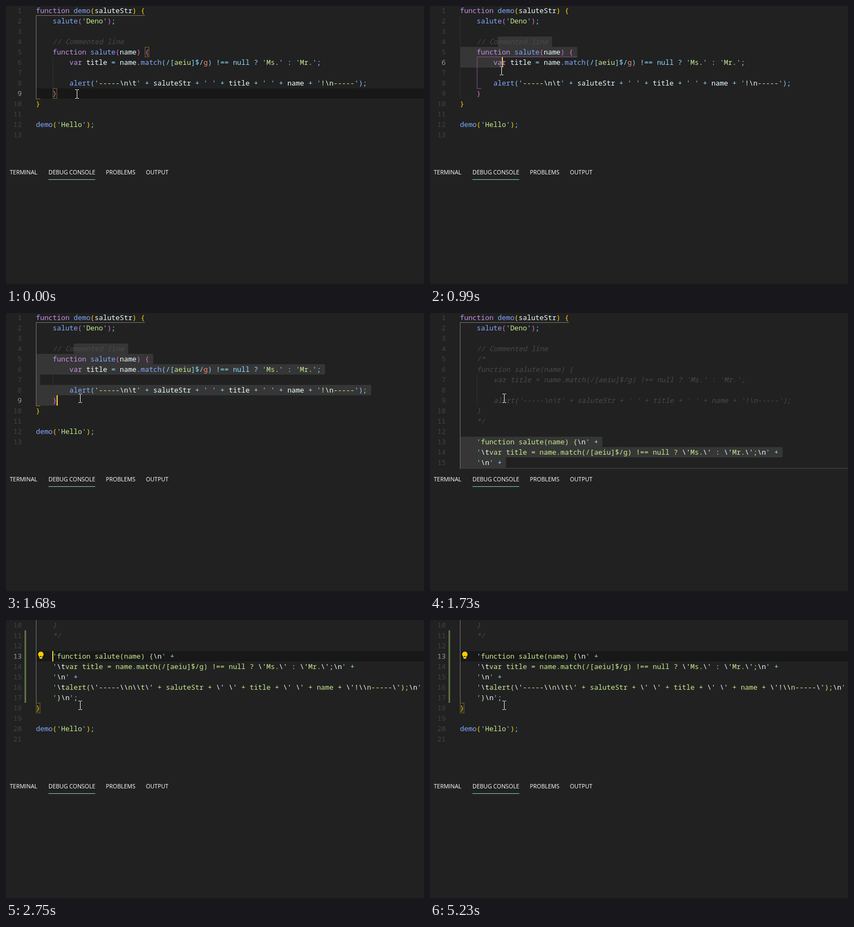
Write an HTML page with a canvas that moves like this. It is 768 by 512 pixels and loops after 5.64 s.

```html
<!DOCTYPE html>
<html lang="en">
<head>
<meta charset="utf-8">
<style>
  html, body { margin: 0; width: 100%; height: 100%; overflow: hidden; background: #212121; }
  canvas { display: block; }
</style>
</head>
<body>
<canvas id="stage" width="768" height="512"></canvas>
<script>
const ctx = document.getElementById('stage').getContext('2d');
const LOOP = 5640, LEFT = 55, CELL = 7.7, ROW = 19, PANEL_TOP = 286;
const CODE_FONT = '12.83px "Noto Sans Mono", "DejaVu Sans Mono", monospace';
const COLOR = {
  plain: '#eeffff', keyword: '#c792ea', call: '#82aaff', string: '#c8ed90',
  punct: '#89ddff', flag: '#f78c6c', comment: '#4a4a4a'
};
const BRACKETS = ['#ffd700', '#da70d6', '#87cefa'];

const before = String.raw`function demo(saluteStr) {
    salute('Deno');

    // Commented line
    function salute(name) {
        var title = name.match(/[aeiu]$/g) !== null ? 'Ms.' : 'Mr.';

        alert('-----\n\t' + saluteStr + ' ' + title + ' ' + name + '!\n-----');
    }
}

demo('Hello');
`.split('\n');

const after = [
  ...before.slice(0, 4),
  '    /*',
  ...before.slice(4, 9),
  '    */',
  '',
  ...String.raw`    'function salute(name) {\n' +
    '\tvar title = name.match(/[aeiu]$/g) !== null ? \'Ms.\' : \'Mr.\';\n' +
    '\n' +
    '\talert(\'-----\\n\\t\' + saluteStr + \' \' + title + \' \' + name + \'!\\n-----\');\n' +
    '}\n';`.split('\n'),
  ...before.slice(9)
];

// Returns, per line, a list of [column, text, colour, italic].
function highlight(lines) {
  const token = /\/\/.*|'(?:\\.|[^'\\])*'|\/\[.*?\/g|\w+|[^\s\w]/g;
  let depth = 0, inBlock = false;
  return lines.map(line => {
    const out = [];
    if (line.includes('/*')) inBlock = true;
    if (inBlock) {
      if (line.includes('*/')) inBlock = false;
      return [[0, line, COLOR.comment, true]];
    }
    for (const { 0: text, index } of line.matchAll(token)) {
      const add = (offset, part, color, italic) => out.push([index + offset, part, color, italic]);
      if (text.startsWith('//')) add(0, text, COLOR.comment, true);
      else if (text[0] === "'") {
        for (const m of text.matchAll(/\\.|'|[^\\']+/g)) {
          add(m.index, m[0], m[0] === "'" ? COLOR.punct : m[0][0] === '\\' ? COLOR.plain : COLOR.string);
        }
      } else if (text.startsWith('/[')) {
        for (const m of text.matchAll(/\w+|\W/g)) {
          add(m.index, m[0], m[0] === 'g' ? COLOR.flag : /\w/.test(m[0]) ? COLOR.string : COLOR.punct);
        }
      } else if ('({'.includes(text)) add(0, text, BRACKETS[depth++]);
      else if (')}'.includes(text)) add(0, text, BRACKETS[--depth]);
      else if (/^(function|var)$/.test(text)) add(0, text, COLOR.keyword);
      else if (text === 'null' || /\W/.test(text)) add(0, text, COLOR.punct);
      else add(0, text, line[index + text.length] === '(' ? COLOR.call : COLOR.plain);
    }
    return out;
  });
}

const makeDoc = (lines, guides) => ({ lines, guides, tokens: highlight(lines) });
const source = makeDoc(before, [[0, 2, 9], [4, 6, 8]]);
const result = makeDoc(after, [[0, 2, 17], [4, 7, 9]]);

const outer = { col: 0, first: 1, last: 10, endCol: 26, color: '#77736a', tail: '#8f7a10' };
const inner = { col: 4, first: 5, last: 9, endCol: 28, color: '#7d5280', tail: '#7d5280' };
const resultScope = { ...outer, last: 18 };

const editing = { doc: source, top: -1, scope: outer };
const drag = (line, col, scope) => ({ ...editing, scope, caret: [line, col], select: [4, 9, line, col] });
const scrolled = { doc: result, top: -171, scope: resultScope, band: 13, caret: [13, 4] };
const states = [
  [0, { ...editing, band: 9, boxes: [[5, 26], [9, 4]] }],
  [660, { ...editing, band: 4, caret: [4, 9] }],
  [755, { ...drag(4, 10, outer), match: 'm' }],
  [800, drag(5, 10, outer)],
  [930, drag(6, 10, inner)],
  [1040, drag(7, 0, inner)],
  [1250, drag(9, 5, outer)],
  [1730, { doc: result, top: -1, scope: resultScope, select: [13, 0, 17, 10] }],
  [1760, scrolled],
  [1990, { ...scrolled, boxes: [[18, 0]], changed: [11, 17], bulb: true }]
];
const blinks = [2220, 2750, 3250, 3710, 4240, 4700, 5230];

const mousePath = [
  [50, 130, 161], [190, 128, 146], [330, 125, 112], [470, 125, 82], [605, 127, 68],
  [700, 125, 67], [760, 129, 68], [850, 131, 82], [980, 131, 118],
  [1100, 132, 120], [1165, 133, 130], [1215, 136, 156]
];

function mouseAt(time) {
  const t = 50 + Math.floor((time - 50) / 46.66) * 46.66;
  const next = mousePath.findIndex(p => p[0] > t);
  if (next === 0) return mousePath[0].slice(1);
  if (next < 0) return mousePath.at(-1).slice(1);
  const [a, b] = [mousePath[next - 1], mousePath[next]];
  const k = (t - a[0]) / (b[0] - a[0]);
  return [1, 2].map(i => Math.round(a[i] + (b[i] - a[i]) * k));
}

function rect(color, x, y, w, h) {
  ctx.fillStyle = color;
  ctx.fillRect(x, y, w, h);
}

function roundBox(color, x, y, w, h) {
  ctx.fillStyle = color;
  ctx.beginPath();
  ctx.roundRect(x, y, w, h, 2);
  ctx.fill();
}

const colX = col => LEFT + col * CELL;

// Each glyph sits in its own cell of the monospaced grid.
function drawCells(text, x, y, color, italic) {
  ctx.font = (italic ? 'italic ' : '') + CODE_FONT;
  ctx.fillStyle = color;
  [...text].forEach((ch, i) => ch !== ' ' && ctx.fillText(ch, x + i * CELL, y));
}

function drawEditor(state, caretOn) {
  const { doc, top, scope, band, caret, select, boxes = [] } = state;
  const lineY = line => top + (line - 1) * ROW;
  const activeLine = band || (caret && caret[0]);

  if (band) rect('#181818', LEFT, lineY(band), 768 - LEFT, ROW);
  if (state.match) {
    doc.lines.forEach((line, i) => [...line].forEach((ch, col) => {
      if (ch.toLowerCase() === state.match) roundBox('#303030', colX(col), lineY(i + 1), CELL, ROW);
    }));
  }
  if (select) {
    const [l1, c1, l2, c2] = select;
    for (let line = l1; line <= l2; line++) {
      const from = line === l1 ? c1 : 0;
      const to = line === l2 ? c2 : doc.lines[line - 1].length + 1;
      roundBox('#363636', colX(from), lineY(line), (to - from) * CELL, ROW);
    }
  }

  for (const [col, first, last] of doc.guides) {
    rect('#303030', Math.floor(colX(col) + 0.3), lineY(first), 1, (last - first + 1) * ROW);
  }
  const x = Math.floor(colX(scope.col) + 0.3);
  const y1 = lineY(scope.first + 1) - 1, y2 = lineY(scope.last);
  rect(scope.color, x, y1, 1, y2 - y1);
  rect(scope.color, x, y1, (scope.endCol - scope.col) * CELL, 1);
  rect(scope.tail, x, y2, 8, 1);

  for (const [line, col] of boxes) {
    ctx.strokeStyle = '#75652a';
    ctx.strokeRect(Math.floor(colX(col) + 0.3) + 0.5, lineY(line) + 0.5, 7, ROW - 1);
  }

  doc.tokens.forEach((tokens, i) => {
    const line = i + 1, y = lineY(line) + 14, label = String(line);
    drawCells(label, 29 - label.length * CELL, y, line === activeLine ? '#8f9d9f' : '#424242');
    for (const [col, text, color, italic] of tokens) drawCells(text, colX(col), y, color, italic);
  });

  if (state.changed) {
    const [first, last] = state.changed;
    rect('#5f7048', 34, lineY(first), 3, (last - first + 1) * ROW);
  }
  if (state.bulb) drawBulb(64, lineY(13) + 6);
  if (caret && caretOn) rect('#ffcb45', Math.floor(colX(caret[1])), lineY(caret[0]), 2, ROW);
}

function drawBulb(x, y) {
  ctx.fillStyle = '#ffcc00';
  ctx.beginPath();
  ctx.arc(x, y, 5, 0, Math.PI * 2);
  ctx.fill();
  rect('#ffcc00', x - 2.5, y + 3, 5, 5);
  rect('#181818', x - 1, y + 3, 2, 2);
}

function drawPanel() {
  rect('#212121', 0, PANEL_TOP, 768, 512 - PANEL_TOP);
  ctx.font = '10.5px "Open Sans", "Noto Sans", sans-serif';
  ctx.fillStyle = '#ffffff';
  [['TERMINAL', 7], ['DEBUG CONSOLE', 78], ['PROBLEMS', 183.5], ['OUTPUT', 257]]
    .forEach(([text, x]) => ctx.fillText(text, x, 309));
  rect('#80cbc4', 78, 318, 86, 1);
  rect('#1a1a1a', 0, 510, 768, 2);
}

function drawMouse([x, y]) {
  const parts = [[-3, -8, 3, 1], [1, -8, 3, 1], [0, -7, 1, 15], [-3, 8, 3, 1], [1, 8, 3, 1]];
  for (const [dx, dy, w, h] of parts) rect('#111111', x + dx - 0.5, y + dy - 0.5, w + 1, h + 1);
  for (const [dx, dy, w, h] of parts) rect('#ffffff', x + dx, y + dy, w, h);
}

function draw(now) {
  const time = now % LOOP;
  const state = states.findLast(([at]) => time >= at)[1];
  const caretOn = blinks.filter(at => time >= at).length % 2 === 0;
  rect('#212121', 0, 0, 768, 512);
  drawEditor(state, caretOn);
  drawPanel();
  drawMouse(mouseAt(time));
}

let start;
function tick(now) {
  start ??= now;
  draw(Math.max(0, now - start));
  requestAnimationFrame(tick);
}
draw(0);
requestAnimationFrame(tick);
</script>
</body>
</html>
```
